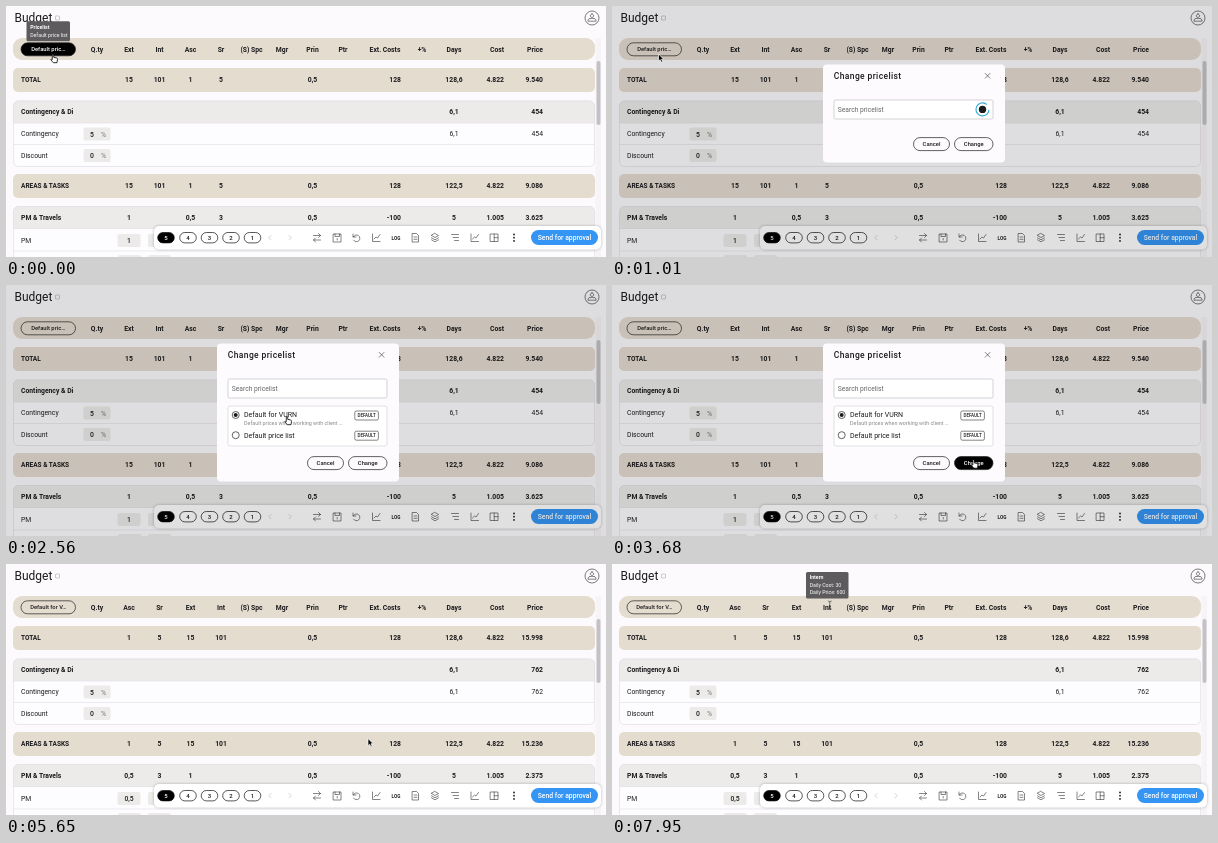
Animation of 600x251 px, one loop 8 s. Source, as an HTML page:

```html
<!DOCTYPE html>
<html lang="en">
<head>
<meta charset="utf-8">
<title>Budget</title>
<style>
html, body { margin: 0; width: 100%; height: 100%; overflow: hidden; background: #fcfafd; }
svg { display: block; width: 100%; height: 100%; font-family: Roboto, Arial, sans-serif; font-size: 6.8px; fill: #1c1b1d; }
.b { font-weight: 700; }
.m { font-weight: 500; }
.line { fill: none; stroke: #333; stroke-width: .6; stroke-linecap: round; stroke-linejoin: round; }
</style>
</head>
<body>
<svg id="stage" viewBox="0 0 600 251" xmlns="http://www.w3.org/2000/svg"></svg>
<script>
const LOOP = 8000;
const TAN = '#e5dcd0', GREY = '#ecebea', EDGE = '#e2e0e4', BLUE = '#3495f5', INK = '#1c1b1d';
const ROLE_X = [123, 153.5, 184.5, 215];

const text = (x, y, s, attrs = '') => `<text x="${x}" y="${y}" ${attrs}>${s}</text>`;
const mid = (x, y, s, attrs = '') => text(x, y, s, `text-anchor="middle" ${attrs}`);
const right = (x, y, s, attrs = '') => text(x, y, s, `text-anchor="end" ${attrs}`);
const box = (x, y, w, h, r, fill, attrs = '') =>
  `<rect x="${x}" y="${y}" width="${w}" height="${h}" rx="${r}" fill="${fill}" ${attrs}/>`;
const line = (d, attrs = '') => `<path class="line" d="${d}" ${attrs}/>`;
const group = (id, body, attrs = '') => `<g id="${id}" ${attrs}>${body}</g>`;
const outline = (color, width = .7) => `stroke="${color}" stroke-width="${width}"`;
const BOLD = 'class="b"', MEDIUM = 'class="m"';

function input(x, y, value, unit = '') {
  return box(x, y, unit ? 27 : 23, 13, 2, GREY) + mid(unit ? x + 8.5 : x + 11.5, y + 9, value, MEDIUM)
    + (unit && mid(x + 20, y + 9, unit, 'fill="#77757a"'));
}

function page() {
  const card = (y, h) => box(7.5, y, 581, h, 5, '#fdfcfe', outline(EDGE))
    + `<path d="M7.5 ${y + 22}V${y + 5}a5 5 0 0 1 5-5H583.5a5 5 0 0 1 5 5V${y + 22}z" fill="${GREY}" stroke="${EDGE}" stroke-width=".7"/>`;
  const totals = (y, costs, days, cost) => mid(306.5, y, '0,5', BOLD) + right(395, y, costs, BOLD)
    + mid(448, y, days, BOLD) + right(498, y, cost, BOLD);
  const heads = [[91, 'Q.ty'], [245.5, '(S) Spc'], [276, 'Mgr'], [306.5, 'Prin'], [337, 'Ptr'],
    [379, 'Ext. Costs'], [416, '+%'], [448, 'Days'], [491, 'Cost'], [529, 'Price']];
  return box(0, 0, 600, 251, 0, '#fcfafd')
    + text(8.5, 16, 'Budget', 'font-size="12"')
    + box(49.5, 10, 4, 4, .5, 'none', outline('#99979c', .5))
    + `<circle cx="586" cy="12" r="7" fill="none" ${outline('#444')}/>`
    + line('M582 14.8v-.8q0-1.7 4-1.7t4 1.7v.8zM586 8a1.7 1.7 0 1 1-.01 0z')
    + box(7, 32, 582, 22, 9, TAN)
    + heads.map(([x, s]) => mid(x, 45.5, s, BOLD)).join('')
    + box(7, 62, 582, 24, 5, TAN)
    + text(15, 76, 'TOTAL', `${BOLD} font-size="6.5"`) + totals(76, '128', '128,6', '4.822')
    + card(95, 65.5) + line('M8 138.5H588', `style="stroke:${EDGE}"`)
    + text(15, 108, 'Contingency &amp; Di', BOLD) + mid(448, 108, '6,1', BOLD)
    + text(15, 130.3, 'Contingency') + input(77.5, 121.5, 5, '%') + mid(448, 130.3, '6,1')
    + text(15, 151.8, 'Discount') + input(77.5, 143, 0, '%')
    + box(7, 168, 582, 24, 5, TAN)
    + text(15, 182.3, 'AREAS &amp; TASKS', `${BOLD} font-size="6.5"`) + totals(182.3, '128', '122,5', '4.822')
    + card(200.5, 60) + line('M8 245H588', `style="stroke:${EDGE}"`)
    + text(15, 214.2, 'PM &amp; Travels', BOLD) + totals(214.2, '-100', '5', '1.005')
    + text(15, 236.8, 'PM') + box(142, 228, 23, 13, 2, GREY)
    + box(112, 249, 23, 13, 2, GREY) + box(142, 249, 23, 13, 2, GREY)
    + box(589.5, 32, 5.5, 219, 0, '#f6f4f7') + box(590.5, 55, 4, 64, 2, '#c3c1c5');
}

function figures(id, roles, total, prices, pm, first) {
  const row = (y, values) => values.map((v, i) => mid(ROLE_X[i], y, v, BOLD)).join('');
  return group(id, row(45.5, roles) + row(76, total) + row(182.3, total) + row(214.2, pm)
    + [76, 108, 130.3, 182.3, 214.2].map((y, i) => right(537, y, prices[i], i === 2 ? '' : BOLD)).join('')
    + input(111.5, 228, first));
}

function toolbar() {
  const pages = [160, 182, 203.5, 225, 246.5].map((x, i) =>
    box(x - 8.3, 226.5, 16.6, 10.4, 5.2, i ? '#fff' : '#000', outline('#111'))
    + mid(x, 233.9, 5 - i, `${MEDIUM} font-size="6" fill="${i ? INK : '#fff'}"`)).join('');
  const chart = x => line(`M${x - 3.5} 228v7.5h7.5M${x - 2} 233l2-2 1.5 1 2.5-3.5`);
  return box(148, 220, 447, 23.5, 5, '#fff', 'style="filter:drop-shadow(0 .5px 1.5px #0004)"') + pages
    + line('M265 229.5l-2.2 2.2 2.2 2.2M283 229.5l2.2 2.2-2.2 2.2', 'style="stroke:#b8b6ba"')
    + line('M307.5 229.5h7m-2-2l2 2-2 2M314.5 234h-7m2-2l-2 2 2 2')
    + line('M327.5 228h7.5v8h-7.5zM329 228v2.5h4.5V228M331.2 232.5v1.5')
    + line('M347 228v3h3M347.3 231a3.4 3.4 0 1 1 .3 3.2')
    + chart(370) + mid(390, 233.8, 'LOG', `${BOLD} font-size="4.7"`)
    + line('M406.5 227.5h4l2 2v6.5h-6zM408 231h3M408 233.3h3')
    + line('M429 227.5l3.5 2-3.5 2-3.5-2zM425.5 231.8l3.5 2 3.5-2M425.5 233.8l3.5 2 3.5-2')
    + line('M445.5 228.5h7M447 231.5h5.5M448.5 234.5h4') + chart(468.5)
    + line('M484.5 228h7.5v7.5h-7.5zM488.2 228v7.5M488.2 231.7h3.8')
    + [228.5, 231.7, 234.9].map(y => `<circle cx="508" cy="${y}" r=".9"/>`).join('')
    + box(525, 224, 67, 15, 7.5, BLUE)
    + mid(558.5, 234, 'Send for approval', `${MEDIUM} font-size="6.8" fill="#fff"`);
}

function pill(id, x, y, w, label) {
  return group(id, box(x, y, w, 13, 6.5, 'none', outline('#222'))
    + mid(x + w / 2, y + 8.5, label, `${MEDIUM} font-size="5.8"`));
}

function modal() {
  const option = (id, y, label) => `<circle cx="229.7" cy="${y}" r="3.5" fill="none" ${outline('#222')}/>`
    + `<circle id="${id}" cx="229.7" cy="${y}" r="2"/>`
    + text(238, y + 2.3, label, 'font-size="7"')
    + box(348.8, y - 4, 23.6, 9, 1.5, 'none', outline('#333', .6))
    + mid(360.6, y + 2.2, 'DEFAULT', `${MEDIUM} font-size="4.5"`);
  return box(0, 0, 600, 251, 0, '#000', 'opacity=".12"')
    + box(211, 58.5, 182, 138, 4, '#fdfbfe', 'id="panel"')
    + text(221.8, 72.8, 'Change pricelist', `${MEDIUM} font-size="8.5" letter-spacing=".38"`)
    + line('M373.2 67.4l4.8 4.8m0-4.8l-4.8 4.8')
    + group('search', box(222, 94, 159, 19, 1.5, '#fff', outline('#b8b6bb', .6))
      + text(225.8, 105.8, 'Search pricelist', 'font-size="6.7" fill="#666469"'))
    + group('loader', `<circle cx="370.5" cy="103.4" r="3.7"/>
      <circle id="ring" cx="370.5" cy="103.4" r="6.5" fill="none" stroke="#35acd0" stroke-width="1.1" stroke-dasharray="34 7"/>`)
    + group('list', box(222, 121, 159, 40, 2, '#fff', outline('#cfcdd2', .6))
      + option('radioA', 130, 'Default for VURN')
      + text(238, 140.2, 'Default prices when working with client …', 'font-size="5.4" fill="#88868b"')
      + option('radioB', 150.2, 'Default price list'))
    + group('actions', pill('cancel', 301.5, 171.6, 36, 'Cancel') + pill('change', 342.5, 171.6, 38.5, 'Change'))
    + text(221.8, 193, 'Saving...', `id="saving" font-size="6.2" fill="${BLUE}"`);
}

function tooltip(id, x, y, w, lines) {
  return group(id, box(x, y, w, lines.length > 2 ? 26.5 : 20, 1.5, '#5d5b5e')
    + lines.map((s, i) => text(x + 3.7, y + 7.4 + i * (lines.length > 2 ? 7.3 : 8), s,
      `font-size="5.2" fill="#fff" ${i ? '' : BOLD}`)).join(''));
}
const roleTip = (i, name, cost, price) =>
  tooltip('tip' + i, ROLE_X[i] - 21, 8, 42.5, [name, `Daily Cost: ${cost}`, `Daily Price: ${price}`]);

const pointer = 'stroke="#fff" stroke-width=".7" stroke-linejoin="round"';
const cursor = group('cursor',
  `<path id="arrow" d="M0 0v7.2l1.7-1.5 1.2 2.6 1.3-.6-1.2-2.5h2.2z" fill="#000" ${pointer}/>
   <path id="hand" d="M-.7.8q.7-1.2 1.4 0v2.5l2.9.7q1.1.3.9 1.6L4 8.7H.3L-2.2 5.8q.2-1.2 1.5-.2z"
     fill="#fff" stroke="#000" stroke-width=".8" stroke-linejoin="round"/>
   <path id="beam" class="line" d="M-1.5-4q1.5 0 1.5 1v6q0 1-1.5 1M1.5-4q-1.5 0-1.5 1M0 3q0 1 1.5 1"/>`);

document.getElementById('stage').innerHTML = page()
  + figures('before', ['Ext', 'Int', 'Asc', 'Sr'], [15, 101, 1, 5], ['9.540', '454', '454', '9.086', '3.625'], [1, '', '0,5', 3], 1)
  + figures('after', ['Asc', 'Sr', 'Ext', 'Int'], [1, 5, 15, 101], ['15.998', '762', '762', '15.236', '2.375'], ['0,5', 3, 1, ''], '0,5')
  + pill('oldList', 15, 36.8, 54.5, 'Default pric…') + pill('newList', 15, 36.8, 54.5, 'Default for V…')
  + toolbar() + group('modal', modal())
  + tooltip('tipList', 20.5, 15.3, 43.5, ['Pricelist', 'Default price list'])
  + roleTip(0, 'Associate', 170, 350) + roleTip(1, 'Senior', 250, 500)
  + roleTip(2, 'External', 100, 200) + roleTip(3, 'Intern', 30, 600) + cursor;

const $ = Object.fromEntries([...document.querySelectorAll('[id]')].map(e => [e.id, e]));
const show = (id, on) => $[id].setAttribute('opacity', Number(on));
const clamp = v => Math.max(0, Math.min(1, v));
const between = (t, a, b) => t >= a && t < b;

// Cursor stops: time, x, y
const path = [[0, 47, 48], [590, 46.5, 48], [1060, 46.5, 48], [1450, 285, 146], [1900, 285, 146], [2300, 281, 131],
  [3150, 281, 131], [3600, 361.5, 174.5], [5700, 362, 174.5], [6430, 93, 42], [6620, 122, 41.5],
  [6800, 126, 41], [6930, 143.5, 41.5], [7080, 154, 42], [7250, 158, 42], [7420, 184, 42], [7560, 188, 42], [7760, 216, 41], [8000, 218, 41]];

function locate(t) {
  const i = path.findIndex(p => p[0] > t);
  const [t0, x0, y0] = path[i - 1], [t1, x1, y1] = path[i];
  const u = (t - t0) / (t1 - t0), k = u * u * (3 - 2 * u);
  return [x0 + (x1 - x0) * k, y0 + (y1 - y0) * k];
}

function fillPill(id, on) {
  const [shape, label] = $[id].children;
  shape.setAttribute('fill', on ? '#000' : 'none');
  label.setAttribute('fill', on ? '#fff' : INK);
}

function draw(t) {
  const updated = t >= 5520, listed = t >= 1500, saving = t >= 4150;
  show('before', !updated); show('after', updated);
  show('oldList', !updated); show('newList', updated);
  fillPill('oldList', t < 650);
  show('tipList', clamp((700 - t) / 80));

  show('modal', Math.min(clamp((t - 650) / 150), clamp((5560 - t) / 150)));
  $.panel.setAttribute('height', saving ? 143.5 : listed ? 138 : 98);
  $.actions.setAttribute('transform', `translate(0 ${listed ? 0 : -40})`);
  show('list', listed); show('loader', !listed);
  $.ring.setAttribute('transform', `rotate(${t * .36} 370.5 103.4)`);
  show('radioA', t >= 2420); show('radioB', t < 2420);
  show('search', saving ? .4 : 1); show('actions', saving ? .3 : 1); show('saving', saving);
  fillPill('change', between(t, 3530, 4150));

  [[6580, 6990], [7010, 7330], [7350, 7660], [7690, LOOP]].forEach(([a, b], i) => show('tip' + i, between(t, a, b)));

  const [x, y] = locate(t);
  const hand = t < 680 || between(t, 2220, 3250) || between(t, 3530, 4150);
  const beam = t > 6400 && ROLE_X.some(c => Math.abs(c - x) < 8);
  $.cursor.setAttribute('transform', `translate(${x} ${y})`);
  show('hand', hand); show('beam', beam); show('arrow', !hand && !beam);
}

const start = performance.now();
function tick() {
  draw((performance.now() - start) % LOOP);
  requestAnimationFrame(tick);
}
tick();
</script>
</body>
</html>
```
